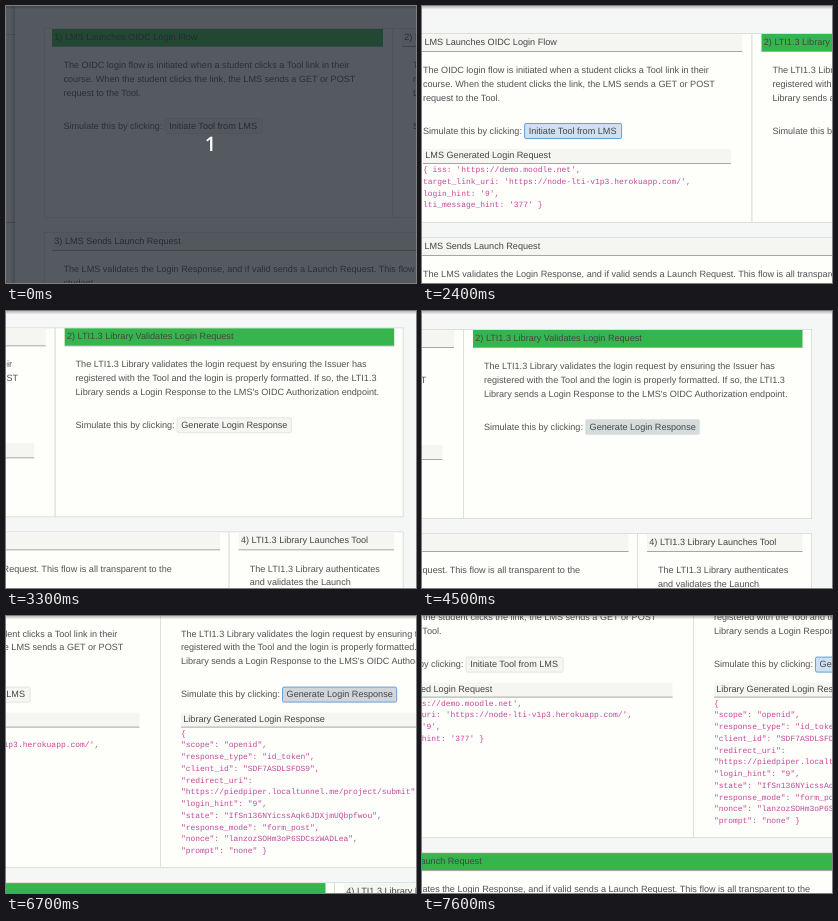
Animation, 410 px wide and 277 px high, one loop 8000 ms. Source, as an HTML page:

```html
<!DOCTYPE html>
<html lang="en">
<head>
<meta charset="utf-8">
<title>Login flow demo</title>
<style>
html, body { margin: 0; width: 100%; height: 100%; overflow: hidden; background: #f4f7f6; }
svg { display: block; width: 410px; height: 277px; }
text { font: 9.1px "Liberation Sans", Arial, sans-serif; fill: #505253; white-space: pre; text-rendering: geometricPrecision; }
.title { fill: #434546; }
.intro { font-size: 14.2px; fill: #4a4c4d; }
.code { font: 7.98px "Liberation Mono", "Courier New", monospace; fill: #c4489a; }
.count { font: 600 20px "Open Sans", sans-serif; fill: #fff; }
</style>
</head>
<body>
<svg id="stage" viewBox="0 0 410 277">
  <defs>
    <linearGradient id="side">
      <stop offset="0" stop-color="#000" stop-opacity="0"/>
      <stop offset="1" stop-color="#000" stop-opacity=".24"/>
    </linearGradient>
    <linearGradient id="top" x2="0" y2="1">
      <stop offset="0" stop-color="#000" stop-opacity=".26"/>
      <stop offset="1" stop-color="#000" stop-opacity="0"/>
    </linearGradient>
  </defs>
</svg>
<script>
const LOOP = 8000, STEP = 100;
const GREEN = '#36b44d', BAR = '#f5f6f2', GROWTH = 81.5;
const LEADING = 13.75, CODE_LEADING = 11.75;
const stage = document.getElementById('stage');

function add(parent, tag, attrs, text) {
  const el = document.createElementNS('http://www.w3.org/2000/svg', tag);
  set(el, attrs);
  if (text) el.textContent = text;
  parent.appendChild(el);
  return el;
}
function set(el, attrs) {
  for (const k in attrs) el.setAttribute(k, attrs[k]);
}
const group = parent => add(parent, 'g', {});
const rect = (parent, x, y, width, height, fill, more) =>
  add(parent, 'rect', { x, y, width, height, fill, ...more });
const label = (parent, x, y, text, cls = '') => add(parent, 'text', { x, y, class: cls }, text);
const lines = (parent, x, y, gap, list, cls) =>
  list.forEach((s, i) => label(parent, x, y + i * gap, s, cls));
const show = (el, on) => el.setAttribute('visibility', on ? 'visible' : 'hidden');

function panel(parent, x, y, width, height) {
  return rect(parent, x + .5, y + .5, width - 1, height, '#fefefb', { stroke: '#dce0dd' });
}
function bar(parent, x, y, width, height, text) {
  const fill = rect(parent, x, y, width, height, BAR);
  rect(parent, x, y + height - .5, width, 1, '#a3a7a6');
  label(parent, x + 2.3, y + height / 2 + 2, text, 'title');
  return fill;
}
function button(parent, x, width, text) {
  const box = rect(parent, x + .5, 112.5, width - 1, 15, BAR, { rx: 1.5 });
  label(parent, x + 4.6, 122.8, text, 'title');
  return box;
}

// Page
const world = group(stage);
rect(world, -60, -60, 69, 500, '#fafcfb');
rect(world, -60, 28, 69, 1, '#efc6cd');
rect(world, -60, 216, 69, 1, '#eba9b6');
rect(world, 4, -60, 5.5, 500, 'url(#side)');
rect(world, 9, -60, 754, 500, '#f4f7f6');
label(world, 215.5, -8.5, 'See the ', 'intro').setAttribute('text-anchor', 'end');
label(world, 215.5, -8.5, 'LTI1.3 Library in action. A Grader Module is used as the Tool example.', 'intro');

// Neighbouring panels share one border
const upper = [panel(world, 38, 22, 349, 189), panel(world, 386, 22, 349, 189)];

const head1 = bar(world, 46, 23, 331, 17.5, '1) LMS Launches OIDC Login Flow');
lines(world, 57.4, 62, LEADING, [
  'The OIDC login flow is initiated when a student clicks a Tool link in their',
  'course. When the student clicks the link, the LMS sends a GET or POST',
  'request to the Tool.']);
label(world, 57.4, 122.8, 'Simulate this by clicking:');
const initiate = button(world, 158.6, 98, 'Initiate Tool from LMS');

const request = group(world);
bar(request, 57.5, 138, 308, 14.5, 'LMS Generated Login Request');
lines(request, 57.4, 161, CODE_LEADING, [
  "{ iss: 'https://demo.moodle.net',",
  "target_link_uri: 'https://node-lti-v1p3.herokuapp.com/',",
  "login_hint: '9',",
  "lti_message_hint: '377' }"], 'code');

const head2 = bar(world, 396, 23, 329.5, 17.5, '2) LTI1.3 Library Validates Login Request');
lines(world, 406.9, 62, LEADING, [
  'The LTI1.3 Library validates the login request by ensuring the Issuer has',
  'registered with the Tool and the login is properly formatted. If so, the LTI1.3',
  "Library sends a Login Response to the LMS's OIDC Authorization endpoint."]);
label(world, 406.9, 122.8, 'Simulate this by clicking:');
const generate = button(world, 508, 115.2, 'Generate Login Response');

const response = group(world);
bar(response, 407, 138, 307.5, 14.5, 'Library Generated Login Response');
lines(response, 406.9, 161, CODE_LEADING, [
  '{',
  '"scope": "openid",',
  '"response_type": "id_token",',
  '"client_id": "SDF7ASDLSFDS9",',
  '"redirect_uri":',
  '"https://piedpiper.localtunnel.me/project/submit",',
  '"login_hint": "9",',
  '"state": "IfSn136NYicssAqk6JDXjmUQbpfwou",',
  '"response_mode": "form_post",',
  '"nonce": "lanzozSOHm3oP6SDCszWADLea",',
  '"prompt": "none" }'], 'code');

const lower = group(world);
panel(lower, 38, 226, 523, 160);
panel(lower, 560, 226, 175, 160);
const head3 = bar(lower, 46, 227, 505.5, 17.5, '3) LMS Sends Launch Request');
lines(lower, 57.4, 266.2, LEADING, [
  'The LMS validates the Login Response, and if valid sends a Launch Request. This flow is all transparent to the',
  'student.']);
bar(lower, 570, 227, 155.5, 17.5, '4) LTI1.3 Library Launches Tool');
lines(lower, 581, 266.2, LEADING, [
  'The LTI1.3 Library authenticates',
  'and validates the Launch']);

rect(stage, 0, 0, 410, 3.5, 'url(#top)');

const countdown = group(stage);
rect(countdown, 0, 0, 410, 277, '#1c222a', { opacity: .74 });
label(countdown, 204.5, 145, '1', 'count').setAttribute('text-anchor', 'middle');

// Motion: time, x, y of the view
const path = [
  [0, 0, 0], [2200, 0, 0], [2300, -18, 2], [2500, -95, 8], [2800, -238, 12],
  [3100, -326, -9], [3400, -343, -4], [3500, -343, -4], [3700, -345, -4],
  [6000, -345, -4], [6100, -344, -4], [6400, -300, -18], [6700, -232, -41.4],
  [6800, -212, -46], [6900, -212, -46], [7000, -203, -49], [7400, -118, -70.4],
  [7500, -118, -70.4], [7600, -115, -71.4], [LOOP, -115, -71.4]
];
function view(t) {
  const i = path.findIndex(k => k[0] > t);
  const [t0, x0, y0] = path[i - 1], [t1, x1, y1] = path[i];
  const p = (t - t0) / (t1 - t0);
  return [x0 + (x1 - x0) * p, y0 + (y1 - y0) * p];
}

const looks = {
  normal: { fill: BAR, stroke: '#e2e5e3' },
  hover: { fill: '#d6dbdc', stroke: '#e2e5e3' },
  pressed: { fill: '#d0d6d9', stroke: '#b0bbc3' },
  active: { fill: '#d0d6da', stroke: '#6b9fd2' },
  focus: { fill: '#cfe1f1', stroke: '#62a0da' }
};
// Latest state whose start time has passed
const at = (t, list) => list.filter(s => s[0] <= t).pop()[1];

function draw(now) {
  const t = Math.floor((now % LOOP) / STEP) * STEP;
  const [x, y] = view(t);
  const answered = t >= 4900;
  world.setAttribute('transform', `translate(${x} ${y})`);
  show(countdown, t < 500);
  show(request, t >= 1200);
  show(response, answered);
  head1.setAttribute('fill', t < 1200 ? GREEN : BAR);
  head2.setAttribute('fill', t >= 1200 && !answered ? GREEN : BAR);
  head3.setAttribute('fill', answered ? GREEN : BAR);
  upper.forEach(p => p.setAttribute('height', 189 + (answered ? GROWTH : 0)));
  lower.setAttribute('transform', `translate(0 ${answered ? GROWTH : 0})`);
  set(initiate, looks[at(t, [[0, 'normal'], [1000, 'hover'], [1100, 'active'], [2400, 'focus'], [4700, 'normal']])]);
  set(generate, looks[at(t, [[0, 'normal'], [4500, 'hover'], [4700, 'pressed'], [6300, 'active'], [7000, 'focus']])]);
}

const start = performance.now();
function tick() {
  draw(performance.now() - start);
  requestAnimationFrame(tick);
}
tick();
</script>
</body>
</html>
```
